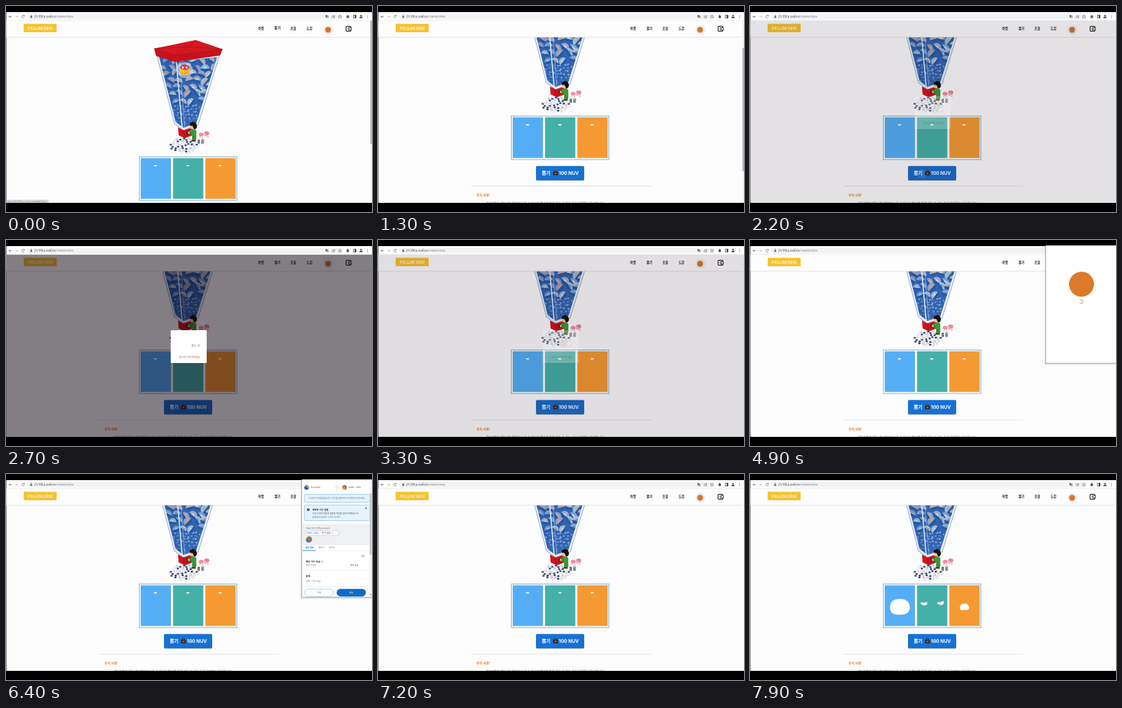
Recreate the animation shown at these times as an HTML page. Size 600 px wide and 338 px high, loop 8000 ms.

```html
<!DOCTYPE html>
<html lang="ko">
<head>
<meta charset="utf-8">
<style>
html, body { margin: 0; width: 100%; height: 100%; overflow: hidden; background: #000; }
svg { display: block; width: 100%; height: 100%; }
text { font-family: "Noto Sans CJK KR", "Noto Sans CJK", "Noto Sans", sans-serif; }
.latin { font-family: Roboto, Arial, sans-serif; }
.brand { font-family: Inter, Arial, sans-serif; }
</style>
</head>
<body>
<svg id="stage" viewBox="0 0 600 338"></svg>
<script>
const LOOP = 8000, SCROLL = 67;
const $ = id => document.getElementById(id);

const rect = (x, y, w, h, fill, more = '') =>
  `<rect x="${x}" y="${y}" width="${w}" height="${h}" fill="${fill}" ${more}/>`;
const circle = (x, y, r, fill, more = '') =>
  `<circle cx="${x}" cy="${y}" r="${r}" fill="${fill}" ${more}/>`;
const oval = (x, y, rx, ry, fill, more = '') =>
  `<ellipse cx="${x}" cy="${y}" rx="${rx}" ry="${ry}" fill="${fill}" ${more}/>`;
const path = (d, fill, more = '') => `<path d="${d}" fill="${fill}" ${more}/>`;
const line = (d, color, width = 1, more = '') =>
  path(d, 'none', `stroke="${color}" stroke-width="${width}" ${more}`);
const text = (x, y, size, str, fill = '#222', more = '') =>
  `<text x="${x}" y="${y}" font-size="${size}" fill="${fill}" ${more}>${str}</text>`;
const group = (id, body, more = '') => `<g id="${id}" ${more}>${body}</g>`;
const MID = 'text-anchor="middle"', BOLD = 'font-weight="700"';

let seed = 11;
const rnd = () => (seed = (seed * 16807) % 2147483647) / 2147483647;
const pick = list => list[Math.floor(rnd() * list.length)];

const dome = (r, fill, opacity) =>
  path(`M${-r} 0A${r} ${r} 0 0 1 ${r} 0Z`, fill, `opacity="${opacity}"`);

function capsules() {
  let out = '';
  for (let y = 90, row = 0; y < 164; y += 11, row++) {
    for (let x = 250 + row % 2 * 7; x < 352; x += 14) {
      const px = x + rnd() * 5 - 2.5, py = y + rnd() * 5 - 2.5, r = 6 + rnd() * 2;
      out += `<g transform="translate(${px} ${py}) rotate(${rnd() * 120 - 60})">` +
        dome(r, pick(['#a9c3e2', '#c3d3e4', '#8badd9']), .8) +
        dome(r * .72, pick(['#86a9d6', '#c9a79c', '#9bbfc4', '#c79aa6']), .7) +
        dome(r * .42, pick(['#d5e1ee', '#5f8cc8', '#d9a37e']), .8) +
        path(`M${-r} 0A${r} ${r * .6} 0 0 0 ${r} 0Z`, '#2459a6') + '</g>';
    }
  }
  for (let y = 163; y < 200; y += 5) {
    for (let x = 268; x < 325; x += 6) {
      out += oval(x + rnd() * 4, y + rnd() * 2, 1.9, 1.2, pick(['#7099d3', '#5a87c8', '#8cb0de']),
        `transform="rotate(${rnd() * 80 - 40} ${x} ${y})"`);
    }
  }
  return out;
}

function spilled() {
  let out = '';
  for (let i = 0; i < 46; i++) {
    const a = i * 2.4, d = Math.sqrt((i + .5) / 46);
    out += oval(292 + 24 * d * Math.cos(a), 228.5 + 12.5 * d * Math.sin(a), 2, 1.5,
      pick(['#fbfbfb', '#ececef', '#22386a', '#d3d5da', '#2f4a80', '#efe0da']),
      'stroke="#a4a7ad" stroke-width=".35"');
  }
  return out;
}

function boy() {
  return path('M304 203Q309 200 312 205L312 219L309 222L305 221L305 211L299 210L298 206Z', '#3f9a3c') +
    line('M305 209L300 208M308 213L308 221', '#276b2a', .8) +
    circle(305, 198, 4, '#f1c4a0') +
    path('M301 196Q301 190 307 190Q313 191 313 198Q312 203 308 202L306 197Z', '#15110f') +
    circle(299.5, 208, 1.5, '#f1c4a0') + rect(304, 220, 7, 2.2, '#4a3428', 'rx="1"');
}

function machine() {
  return path('M247 80L276 193L291 204L315 195L350 81L279 90Z', '#e9f0f7', 'stroke="#9fb2c4" stroke-width="1.2"') +
    `<g clip-path="url(#glass)">` + rect(240, 80, 120, 125, '#3264b0') + capsules() +
    path('M278 84L289 206L240 206L240 80Z', '#1d4b96', 'opacity=".12"') + '</g>' +
    line('M279 90L289 202', '#dce8f4', 1.8) + line('M285 92L293 200', '#b9cfe8', .7) +
    line('M277 191L291 201L313 193', '#e3ebf3', 1.6) +
    circle(293, 105, 13, '#e5eefb', 'opacity=".55"') +
    circle(293, 105, 9, '#f4bf3c') + path('M285 101A9 9 0 0 1 301 101L297 105L288 104Z', '#d9363b') +
    circle(290, 101, 1.8, '#fff') + circle(296, 101, 1.8, '#fff') + line('M287 109Q293 113 299 108', '#ef8a2c', 1.2) +
    path('M243 70L311 56L355 71L351 81L278 92L246 82Z', '#c8111b') +
    path('M243 70L311 56L355 71L277 81Z', '#d41822') +
    line('M243 70L277 81L355 71M277 81L278 92M243 70L300 67L355 71M311 56L300 67L277 81', '#a91018', .7) +
    path('M282 199L291 204L306 199L306 212L293 217L283 212Z', '#cf141d') +
    line('M291 204L293 217', '#8f0c13', .8) + path('M295 206L303 203L303 209L296 212Z', '#891018') +
    spilled() + boy() +
    oval(320, 211, 4, 3.2, '#ec94a5') + oval(329, 209, 4.2, 3.4, '#e7899b') + circle(327, 212, 2.2, '#f2afbb') +
    line('M318 215L318 217M322 215L322 217M331 213L331 216', '#c9677c', 1) +
    rect(314, 219, 4, 7, '#77797d', 'rx="1"') + rect(320, 218, 4.5, 8, '#8b8d91', 'rx="1"') +
    oval(322, 219, 2.2, .9, '#bfc1c4');
}

function cards() {
  const fills = ['#55aef5', '#45b0a8', '#f59a33'];
  return rect(218.5, 247.5, 160, 71.5, '#fff', 'stroke="#78acca" stroke-width="1"') +
    fills.map((f, i) => rect(220.8 + i * 53, 249.6, 49.7, 66.8, f)).join('') +
    group('dashes', [0, 1, 2].map(i => rect(242.7 + i * 53, 261, 4.8, 2, '#fff', 'rx=".5"')).join('')) +
    group('parts',
      path('M229.5 286C229.5 276 236 272 246 272C256 272 262 277 262 286C262 295 255 298 245 298C235 298 229.5 295 229.5 286Z', '#fff') +
      path('M279 277.5Q284.5 279 290 277Q291.5 281 288 282.5Q280.5 283 279 277.5Z', '#fff') +
      path('M306.5 277.5Q312 278.5 317 275Q319 279 315.5 281.5Q308 283 306.5 277.5Z', '#fff') +
      path('M351.5 280C355 278.5 359 282 359 286C359 290 355 292 351.5 289.5C348 292 344 290 344 286C344 282 348 278.5 351.5 280Z', '#fff'));
}

function button() {
  return rect(259, 330.6, 79, 23.4, '#000', 'rx="2" opacity=".22"') +
    rect(259, 329.5, 79, 23.4, '#1771d3', 'rx="2" id="btn"') +
    `<g clip-path="url(#btnClip)">${circle(282, 342, 0, '#fff', 'id="ripple"')}</g>` +
    text(268.5, 344, 7.7, '뽑기', '#fff', BOLD) +
    rect(287, 338.5, 8, 6.5, '#4a2b1c', 'rx="1.5"') + rect(289.2, 336.8, 3.6, 3, 'none', 'rx="1" stroke="#4a2b1c"') +
    rect(290, 341, 2, 1.5, '#d19a45') +
    text(296.6, 344, 7.7, '100 NUV', '#fff', `${BOLD} class="brand"`);
}

function page() {
  return machine() + cards() + button() +
    line('M152 362.5H447', '#dedede', .8) +
    text(161.5, 379, 5.1, '주의 사항!', '#ee7522', BOLD) +
    text(177, 392, 4.9, '해당상품은 PELLIM DEN에서 볼 수 있으며 뽑기를 통해 받을 수 있는 파츠 아이템을 의미합니다!', '#777');
}

function header() {
  const nav = [['마켓', 418], ['뽑기', 445], ['조합', 471], ['도감', 497.5]];
  return rect(0, 24, 600, 27, '#fefdfe') + line('M0 51.2H598', '#d9d9dc', .8) +
    rect(29, 29.3, 54, 13.7, '#f7c22e') +
    text(56, 39, 6.8, 'PELLIM DEN', '#fff6df', `${BOLD} ${MID} class="brand"`) +
    nav.map(([s, x], i) => text(x, 39, 5.2, s, '#222', `${BOLD} ${MID} id="nav${i}"`)).join('') +
    circle(528.5, 39, 8, '#efedeb') + circle(528, 39, 4.8, '#d5762e') +
    rect(557.5, 33.4, 8, 8, 'none', 'rx="1.2" stroke="#151515" stroke-width="1.2"') +
    rect(561, 35.6, 5.4, 3.7, '#fff', 'rx=".7" stroke="#151515" stroke-width="1"') + circle(563.3, 37.4, .7, '#151515');
}

function toolbar() {
  const ink = '#5d6166';
  return rect(.5, 10, 599.5, 14, '#fefefe') + rect(34, 12.3, 518, 9.6, '#f1f3f4', 'rx="4.8"') +
    line('M.5 23.8H600', '#dcdee0', .6) +
    line('M9.5 17.5H5M7 15.5L5 17.5L7 19.5', ink, .8) +
    line('M15 17.5H19.5M17.5 15.5L19.5 17.5L17.5 19.5', '#b5b8bb', .8) +
    line('M30 16.2A2.2 2.2 0 1 0 30.2 18.2M30.3 14.8V16.5H28.5', ink, .7) +
    rect(39.8, 16.8, 3, 2.6, ink) + line('M40.4 17V15.8A.9 .9 0 0 1 42.2 15.8V17', ink, .6) +
    `<text class="latin" x="46.5" y="19.3" font-size="4.7" fill="#4a4d51">j7c108.p.ssafy.io<tspan fill="#888c90">/market/draw</tspan></text>` +
    rect(523.8, 15, 3.2, 3.6, ink) + rect(525.8, 16.2, 3, 3.6, '#9a9da1') +
    rect(534.8, 16.2, 4, 3.4, 'none', `stroke="${ink}" stroke-width=".6"`) + line('M536.5 18L539.5 15', ink, .6) +
    path('M547.5 14.6L548.3 16.6L550.4 16.7L548.8 18L549.3 20L547.5 18.9L545.7 20L546.2 18L544.6 16.7L546.7 16.6Z', 'none', `stroke="${ink}" stroke-width=".6"`) +
    rect(558.3, 16, 4, 3.8, '#55595e', 'rx=".6"') + circle(560.2, 15.6, 1, '#55595e') +
    rect(569.3, 15, 4.6, 4.8, 'none', 'stroke="#34373b" stroke-width=".7"') + rect(571.6, 15, 2.3, 4.8, '#34373b') +
    circle(582, 16, 1.4, '#55505c') + path('M579.2 20Q579.2 17.6 582 17.6Q584.8 17.6 584.8 20Z', '#55505c') +
    [15.3, 17.4, 19.5].map(y => circle(592.7, y, .6, ink)).join('');
}

function modal() {
  return rect(270, 149, 59, 54, '#000', 'rx="2" opacity=".2"') + rect(270, 148, 59, 54, '#fff', 'rx="1.5"') +
    text(311, 175.2, 4.6, '뽑는 중', '#888', MID) +
    text(301, 193.5, 4, '잠시만 기다려주세요', '#9a6a45', MID);
}

function gem(x, y, r, a, b, c) {
  return circle(x, y, r, a) + path(`M${x} ${y - r}A${r} ${r} 0 0 1 ${x + r} ${y}L${x - r * .3} ${y + r * .3}Z`, b) +
    path(`M${x - r} ${y}A${r} ${r} 0 0 0 ${x} ${y + r}L${x + r * .3} ${y - r * .1}Z`, c);
}

function walletForm() {
  const small = 3.5, grey = '#666a70', blue = '#1274c8';
  const box = (y, h) => rect(489, y, 107, h, '#e6f3fc', 'rx="2" stroke="#74b6e4" stroke-width=".7"');
  return gem(493, 22, 3.8, '#2878c8', '#f0a132', '#26489a') + text(500, 23.4, small, 'Account1', '#444') +
    line('M543 13V31M485 31.2H597', '#dfe1e4', .6) +
    circle(543, 22, 3.2, '#fff', 'stroke="#d2d5d8" stroke-width=".6"') + line('M542.3 20.6L543.7 22L542.3 23.4', grey, .5) +
    gem(555, 22, 3.7, '#e84d3d', '#35a76c', '#f29d34') + text(561, 23.4, small, '0x4b7...e19a', '#444') +
    box(33.5, 12.8) + text(542.5, 41, 3.45, '이 주소가 저장되었습니다. 여기를 클릭하여 주소록에 추가하세요.', '#39698b', MID) +
    box(51, 25.5) + circle(495.5, 58.6, 2.2, '#17354f') + rect(495.2, 57.5, .7, 2.4, '#fff') +
    text(502, 59.6, 3.8, '새로운 가스 경험', '#222', BOLD) +
    text(502, 65.7, small, '가스비 추정 방법과 맞춤형 작업을 업데이트했습니다.', '#40464c') +
    text(502, 72.2, small, '설정에서 향상된 가스비 UI 켜기', blue) +
    line('M588.7 54.8L591.5 57.6M591.5 54.8L588.7 57.6', '#222', .7) +
    rect(485, 82, 112, 35, '#eff0f2') + text(491.5, 90, 3.7, 'https://j7c108.p.ssafy.io', grey, 'class="latin"') +
    rect(491, 93, 54, 8, '#f8f8f9', 'rx="1" stroke="#c5c8cc" stroke-width=".6"') +
    text(493, 98.4, 3.3, '0x4b7...e19a', blue) + text(516, 98.4, 3.3, ': 알 수 없음 ⓘ', '#444') +
    gem(496.7, 107.6, 5, '#e95741', '#35a774', '#2b86c7') +
    text(490.5, 122.3, small, '세부 정보', blue, BOLD) + text(512, 122.3, small, '데이터', grey) + text(529, 122.3, small, '16진수', grey) +
    line('M485 126H597', '#dcdee1', .6) + line('M486 125.7H508', blue, .8) +
    text(582, 135.5, 3.2, '편집', blue) +
    text(491.5, 144.6, 3.9, '예상 가스 요금 ⓘ', '#222', BOLD) +
    text(491.5, 151.4, small, '추천 사이트', grey) + text(564, 151.4, small, '최대 요금', '#444') +
    line('M489 158H594', '#e2e4e7', .6) +
    text(491.5, 169.2, 3.9, '합계', '#222', BOLD) + text(491.5, 177, small, '금액 + 가스 요금', grey) +
    line('M485 184.5H597', '#dfe1e4', .6) +
    rect(489.5, 188.7, 47.5, 12, '#fff', 'rx="6" stroke="#8cb8dc" stroke-width=".7"') + text(513.3, 196.1, 3.7, '거부', blue, MID) +
    rect(542, 188.5, 48, 12.4, '#0d6cc4', 'rx="6.2" id="confirm"') + text(566, 196.1, 3.7, '확인', '#fff', MID) +
    rect(595.5, 10, 4.5, 192, '#f3f3f3') + rect(596.3, 32, 3, 100, '#c4c5c7') + path('M596.5 197.5H599.3L597.9 199.3Z', '#555');
}

function popup() {
  return rect(482.5, 10, 120, 195, '#000', 'opacity=".08"') + rect(484, 9.5, 118, 193.5, '#000', 'opacity=".25"') +
    rect(485, 9, 116, 193, '#fff', 'stroke="#a7a9ac" stroke-width=".6"') +
    group('loading', circle(543.5, 72.5, 20.5, '#dd7a2a') +
      line('M543 98A3 3 0 1 1 540 101', '#e98a3d', 1, 'id="spinner"')) +
    group('form', walletForm());
}

$('stage').innerHTML =
  `<defs><clipPath id="view"><rect x=".5" y="24" width="599.5" height="299"/></clipPath>
   <clipPath id="glass"><path d="M251 83L278 190L291 200L312 192L346 84L279 91Z"/></clipPath>
   <clipPath id="btnClip"><rect x="259" y="329.5" width="79" height="23.4" rx="2"/></clipPath></defs>` +
  rect(0, 0, 600, 338, '#000') +
  `<g clip-path="url(#view)">` + rect(0, 24, 600, 299, '#fdfcfd') + group('page', page()) + header() +
  group('bar', rect(597.4, 24, 2.6, 299, '#f3f3f4') + rect(597.5, 24, 2.2, 202, '#a9abae', 'id="thumb"')) +
  rect(0, 24, 600, 299, '#0a000c', 'id="shade"') + group('modal', modal()) +
  group('status', rect(0, 317.7, 70, 5.3, '#d9dbde') + text(2, 321.8, 3.8, 'https://j7c108.p.ssafy.io/market/draw', '#7b7f84', 'class="latin"')) +
  '</g>' + toolbar() + group('popup', popup());

const clamp = v => Math.max(0, Math.min(1, v));
const span = (t, from, to) => clamp((t - from) / (to - from));
const smooth = p => p * p * (3 - 2 * p);

// cubic-bezier(.4, 0, .2, 1)
function standard(x) {
  let lo = 0, hi = 1;
  for (let i = 0; i < 18; i++) {
    const u = (lo + hi) / 2, v = 1 - u;
    if (1.2 * v * v * u + .6 * v * u * u + u * u * u < x) lo = u; else hi = u;
  }
  return lo * lo * (3 - 2 * lo);
}

const set = (id, name, value) => $(id).setAttribute(name, value);
const show = (id, on) => set(id, 'visibility', on ? 'inherit' : 'hidden');

function draw(t) {
  const y = SCROLL * smooth(span(t, 420, 1150));
  set('page', 'transform', `translate(0 ${-y})`);
  set('thumb', 'y', 24 + y * .67);

  const hover = 1 - span(t, 450, 600);
  set('nav1', 'font-size', 5.2 + .4 * hover);
  set('nav1', 'y', 39 - .9 * hover);
  show('status', t < 100);

  const fade = standard(span(t, 2147, 2372)) * (1 - standard(span(t, 3205, 3400)));
  set('shade', 'opacity', .5 * fade);
  set('modal', 'opacity', fade);
  show('bar', fade === 0);

  const wave = span(t, 2080, 2630);
  set('ripple', 'r', 60 * smooth(wave));
  set('ripple', 'opacity', wave < 1 ? .12 * (1 - wave) : 0);
  set('btn', 'fill', t > 1700 && t < 3600 ? '#1a6ccb' : '#1771d3');

  show('popup', t >= 3800 && t < 6700);
  show('loading', t < 5300);
  show('form', t >= 5300);
  set('spinner', 'transform', `rotate(${t * .36} 543 101)`);
  set('confirm', 'fill', t >= 6300 ? '#0d6cc4' : '#1780dc');

  show('dashes', t < 7600);
  show('parts', t >= 7600);
}

function tick() {
  draw(performance.now() % LOOP);
  requestAnimationFrame(tick);
}
tick();
</script>
</body>
</html>
```
